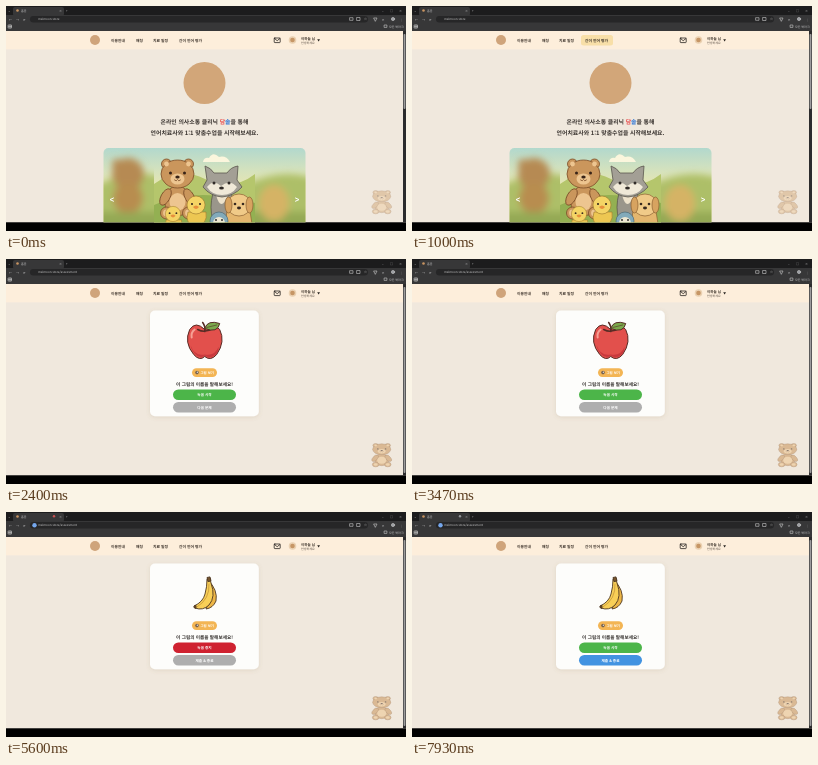
Write an HTML page that moves like this. It is 400 by 225 pixels and loops after 8000 ms.

```html
<!DOCTYPE html>
<html lang="ko">
<head>
<meta charset="utf-8">
<title>언어 평가</title>
<style>
html, body { margin: 0; width: 100%; height: 100%; overflow: hidden; background: #000; }
svg { display: block; width: 100vw; height: 100vh; }
text { font-family: "Noto Sans CJK KR", "Noto Sans CJK", sans-serif; text-rendering: geometricPrecision; }
.mid { text-anchor: middle; }
.bold { font-weight: 700; }
.line { fill: none; stroke-linecap: round; stroke-linejoin: round; }
</style>
</head>
<body>
<svg viewBox="0 0 400 225">
  <defs>
    <filter id="shadow" x="-20%" y="-20%" width="140%" height="140%">
      <feDropShadow dx="0" dy="1" stdDeviation="2" flood-color="#8a7050" flood-opacity=".16"/>
    </filter>
    <filter id="blur"><feGaussianBlur stdDeviation="3.5"/></filter>
    <linearGradient id="sky" x2="0" y2="1">
      <stop stop-color="#b2d8cd"/><stop offset=".3" stop-color="#d5e2bd"/><stop offset=".55" stop-color="#ebe6af"/>
    </linearGradient>
    <clipPath id="screen"><rect y="25" width="400" height="191.3"/></clipPath>
    <clipPath id="slide"><rect x="97.5" y="142" width="202" height="82" rx="5"/></clipPath>
    <clipPath id="scene"><rect x="148" y="142" width="101" height="75"/></clipPath>
    <g id="teddy" stroke="#7a4c28" stroke-width=".8">
      <g fill="#ca965c">
        <ellipse cx="0" cy="27" rx="13" ry="15"/>
        <ellipse cx="-12" cy="23" rx="4.5" ry="9" transform="rotate(28 -12 23)"/>
        <ellipse cx="12" cy="23" rx="4.5" ry="9" transform="rotate(-28 12 23)"/>
        <circle cx="-11" cy="39" r="6"/><circle cx="11" cy="39" r="6"/>
        <circle cx="-11" cy="-10" r="5"/><circle cx="11" cy="-10" r="5"/>
        <ellipse rx="16.5" ry="14"/>
      </g>
      <g fill="#edc590" stroke="none">
        <ellipse cy="28" rx="8" ry="9"/><ellipse cy="5" rx="7" ry="5.5"/>
        <circle cx="-11" cy="-10" r="2.4"/><circle cx="11" cy="-10" r="2.4"/>
        <circle cx="-11" cy="39" r="3.4"/><circle cx="11" cy="39" r="3.4"/>
      </g>
      <g fill="#382317" stroke="none">
        <circle cx="-7" cy="-1" r="1.5"/><circle cx="7" cy="-1" r="1.5"/><ellipse cy="3" rx="2.2" ry="1.5"/>
      </g>
      <path class="line" d="M-3 6Q-1 8 0 5.5Q1 8 3 6"/>
    </g>
    <g id="duck">
      <path d="M-8 7Q-12 20 0 20T10 7Z" fill="#edc752" stroke="#9b762d" stroke-width=".6"/>
      <circle r="9" fill="#f4d465" stroke="#9b762d" stroke-width=".6"/>
      <path d="M-3 2Q0 -1 3 2Q0 6 -3 2Z" fill="#e7903c"/>
      <circle cx="-4" cy="-1" r="1.1" fill="#36291d"/><circle cx="4" cy="-1" r="1.1" fill="#36291d"/>
    </g>
  </defs>

  <rect width="400" height="216.3" fill="#1c1c1d"/>
  <rect x="7" y="1" width="51" height="9" rx="2" fill="#373738"/>
  <rect y="9" width="400" height="16" fill="#373738"/>
  <rect x="24" y="10" width="338" height="6.6" rx="3.3" fill="#262627"/>
  <g fill="#c9c9ca" font-size="3">
    <circle cx="11.5" cy="4.5" r="1.3" fill="#c99461"/>
    <text x="15" y="5.8">홈문</text>
    <text x="2" y="5.8">⌄</text>
    <text x="53" y="5.8">×</text><text x="60" y="5.8">+</text>
    <text x="3" y="14.5">←</text><text x="10" y="14.5">→</text><text x="17" y="14.5">⟳</text>
    <text id="url" x="32" y="14.4"></text>
    <text x="383" y="21.8">모든 북마크</text>
    <text x="376" y="5.6">–</text><text x="384" y="5.6">□</text><text x="393" y="5.6">×</text>
    <text x="358" y="14.4">☆</text>
    <text x="376" y="14.5">⊓</text><text x="394" y="14.5">⋮</text>
  </g>
  <g class="line" stroke="#c9c9ca" stroke-width=".6">
    <rect x="344" y="11.7" width="3" height="2.6"/><rect x="351" y="11.5" width="3" height="3"/>
    <path d="M368 12h3l-1.5 3zM378.5 19h2.4v2.4h-2.4zM2.5 19h3v3h-3zM4 19v3M2.5 20.5h3"/>
    <circle cx="387" cy="13" r="1.6" fill="#9a9da2"/>
  </g>
  <circle id="site" cx="28.5" cy="13.2" r="2.2"/>
  <circle id="dot" cx="48" cy="4.3" r="1.2"/>

  <g clip-path="url(#screen)">
    <rect y="25" width="400" height="192" fill="#f0e8dd"/>
    <rect y="25" width="397" height="18.3" fill="#fdeedb"/>
    <rect id="hover" x="169" y="29" width="32" height="10.4" rx="2.5" fill="#f8dfa8"/>
    <circle cx="89" cy="34" r="5" fill="#cfa47b"/>
    <g class="bold" font-size="3.8" fill="#3a3028">
      <text x="105" y="35.7">이용안내</text><text x="130" y="35.7">매칭</text>
      <text x="147" y="35.7">치료 일정</text><text x="173" y="35.7">간이 언어 평가</text>
    </g>
    <g class="line" stroke="#292521" stroke-width=".8">
      <rect x="268.2" y="32" width="6" height="4.6" rx=".6"/><path d="M268.5 32.5l2.7 2.2 2.7-2.2"/>
    </g>
    <circle cx="286.5" cy="34" r="3.8" fill="#ead1b2"/><circle cx="286.5" cy="34" r="2.3" fill="#c69665"/>
    <text x="295" y="33.8" font-size="3.5" class="bold" fill="#332a22">이하늘 님</text>
    <text x="295" y="38" font-size="3" fill="#5e5349">안녕하세요</text>
    <path d="M311.2 33.3h2.8l-1.4 2.2z" fill="#292521"/>

    <g id="home">
      <circle cx="198.5" cy="77" r="21" fill="#d2a679"/>
      <g class="mid bold" font-size="5.9" fill="#3a3430">
        <text x="198.5" y="118">온라인 의사소통 클리닉 <tspan fill="#e84a4a">담</tspan><tspan fill="#3478d4">솔</tspan>을 통해</text>
        <text x="198.5" y="129">언어치료사와 1:1 맞춤수업을 시작해보세요.</text>
      </g>
      <g clip-path="url(#slide)">
        <rect x="97" y="142" width="203" height="76" fill="url(#sky)"/>
        <g filter="url(#blur)">
          <path d="M85 182Q125 160 160 172V235H85ZM237 180Q280 158 315 176V235H237Z" fill="#adbf68"/>
          <circle cx="122" cy="168" r="16" fill="#b68a52"/><circle cx="111" cy="158" r="5" fill="#b68a52"/>
          <ellipse cx="122" cy="192" rx="15" ry="16" fill="#b88d50"/>
          <path d="M85 206H160V235H85ZM237 206H315V235H237Z" fill="#94a954"/>
          <ellipse cx="268" cy="197" rx="15" ry="18" fill="#d5b365"/>
        </g>
        <g clip-path="url(#scene)">
          <rect x="148" y="142" width="101" height="76" fill="url(#sky)"/>
          <path d="M148 178Q172 160 199 173T249 168V218H148Z" fill="#b5c66c"/>
          <path d="M148 199Q190 180 249 197V218H148Z" fill="#93b052"/>
          <path d="M197 156q1-5 6-4q4-7 10-1q7-2 11 5Z" fill="#fbf6dd"/>
          <use href="#teddy" transform="translate(171.5 168)"/>
          <g stroke="#5b574f" stroke-width=".8">
            <path d="M207 187Q203 202 207 214H227Q231 202 225 187Z" fill="#9a968b"/>
            <path d="M210 189Q215 207 222 189Z" fill="#eee3cc" stroke="none"/>
            <path d="M197 181L201 174L199 160Q205 162 208 167H221Q225 161 232 160L231 174L236 181Q228 190 216 191Q204 190 197 181Z" fill="#a39f95"/>
            <path d="M201 181Q207 173 215 180Q224 173 231 181Q226 189 216 189T201 181Z" fill="#f0e9d8" stroke="none"/>
            <g fill="#302b27" stroke="none"><circle cx="208" cy="177" r="1.5"/><circle cx="223" cy="177" r="1.5"/><ellipse cx="215.5" cy="182" rx="2.4" ry="1.6"/></g>
          </g>
          <g stroke="#8c6032" stroke-width=".7">
            <path d="M221 205H244L246 218H219Z" fill="#e4b66e"/>
            <ellipse cx="233" cy="199" rx="12" ry="11" fill="#f0ca88"/>
            <ellipse cx="222.5" cy="199" rx="3.5" ry="8" fill="#d7a360"/><ellipse cx="243.5" cy="199" rx="3.5" ry="8" fill="#d7a360"/>
            <g fill="#37291f" stroke="none"><circle cx="229" cy="198" r="1.3"/><circle cx="237" cy="198" r="1.3"/><ellipse cx="233" cy="202" rx="2" ry="1.4"/></g>
          </g>
          <use href="#duck" transform="translate(190 199)"/>
          <use href="#duck" transform="translate(167 208) scale(.85)"/>
          <ellipse cx="213" cy="215" rx="9" ry="9" fill="#82aaba" stroke="#4d6b77" stroke-width=".7"/>
          <ellipse cx="213" cy="217" rx="6" ry="6" fill="#eee8d2"/>
          <circle cx="210" cy="214" r="1" fill="#333"/><circle cx="216" cy="214" r="1" fill="#333"/>
        </g>
      </g>
      <path class="line" stroke="#fff" stroke-width="1" d="M107.5 192l-3.5 1.6 3.5 1.6M289.5 192l3.5 1.6-3.5 1.6"/>
    </g>

    <g id="intro">
      <rect x="144" y="51.5" width="108.8" height="110" rx="5" fill="#fdfdfb" filter="url(#shadow)"/>
      <text class="mid bold" x="199" y="62.7" font-size="7.3" fill="#302c29">간이언어평가</text>
      <g class="mid" font-size="3.35" fill="#77716b">
        <text x="199" y="70">의사소통장애(Communication disorder)는 발화, 언어의 문제로 인</text>
        <text x="199" y="74.6">하여 의사소통에 어려움을 겪는 상태를 말합니다.</text>
      </g>
      <rect x="149" y="78" width="100" height="66" rx="3.5" fill="#fcf2e4"/>
      <text class="bold" x="152" y="86" font-size="4.15" fill="#4b392a">무엇을 평가하나요?</text>
      <g id="about" font-size="3.32" fill="#71685f"></g>
      <g id="checks" font-size="3.6" fill="#514a43"></g>
      <g id="chips" class="mid" font-size="2.5" fill="#41729b"></g>
      <rect id="start" x="167" y="146" width="63" height="11" rx="5.5"/>
      <text class="mid bold" x="198.5" y="152.9" font-size="3.8" fill="#fff">시작하기</text>
    </g>

    <g id="quiz">
      <rect x="144" y="51.5" width="108.8" height="105.8" rx="5" fill="#fdfdfb" filter="url(#shadow)"/>
      <g id="apple" transform="translate(.7 .5)" stroke="#572c25" stroke-width="1" stroke-linejoin="round">
        <path d="M198 70Q189 61 183 70Q177 83 187 95Q193 102 198 97Q204 102 210 95Q219 82 213 70Q207 63 198 70Z" fill="#e2504c"/>
        <path d="M184 86Q188 97 198 95Q208 97 212 87Q212 94 206 97Q202 99 198 96Q193 100 188 94Q184 89 184 86Z" fill="#c9393d" stroke="none"/>
        <path class="line" d="M191 70Q198 74 206 69M198 72Q199 67 196 63" stroke-width="1.6"/>
        <path d="M198 69Q201 60 213 64Q211 74 198 69Z" fill="#7ba94b"/>
        <path class="line" d="M200 68L210 65.5" stroke-width=".6"/>
        <path class="line" d="M185 78Q184 73 188 70" stroke="#f6a094" stroke-width="2"/>
      </g>
      <g id="banana" stroke="#4e3822" stroke-width=".9" stroke-linejoin="round">
        <path d="M202 68Q212 78 210 89Q207 96 200 97Q205 87 201 78Z" fill="#edb646"/>
        <path d="M201 67L204 66L205 71Q210 85 203 93Q197 99 189 96L188 94Q197 90 199 82Q201 75 201 67Z" fill="#f8cf57"/>
        <path d="M201 65.5l3-.6 1 4-3 .8zM188 94l2-.6v3l-2-.7z" fill="#76552d"/>
        <path class="line" d="M203 72Q204 87 191 95" stroke="#b68431" stroke-width=".6"/>
      </g>
      <rect x="186" y="109.2" width="25" height="8.8" rx="4.4" fill="#f3b554"/>
      <circle cx="191" cy="113.6" r="1.8" fill="#74604e"/><circle cx="191.4" cy="113.2" r=".7" fill="#e0ded6"/>
      <text x="194.5" y="114.9" font-size="3.4" class="bold" fill="#fff">그림 보기</text>
      <text class="mid bold" x="198.5" y="126.7" font-size="4.65" fill="#302c29">이 그림의 이름을 말해보세요!</text>
      <rect id="rec" x="167" y="130.4" width="63" height="10.6" rx="5.3"/>
      <text id="recText" class="mid bold" x="198.5" y="137" font-size="3.65" fill="#fff"></text>
      <rect id="next" x="167" y="143" width="63" height="10.6" rx="5.3"/>
      <text id="nextText" class="mid bold" x="198.5" y="149.6" font-size="3.65" fill="#fff"></text>
    </g>

    <g id="helper"><use href="#teddy" transform="translate(375.7 190.3) scale(.55 .39)"/></g>
    <rect x="397" y="25" width="3" height="192" fill="#2c2c2d"/>
    <rect id="thumb" x="397.6" y="28" width="1.8" rx=".8" fill="#9d9d9d"/>
  </g>
  <rect id="flash" width="400" height="225" fill="#fff"/>
</svg>
<script>
const $ = id => document.getElementById(id);
const clamp = x => Math.max(0, Math.min(1, x));
const ramp = (t, start, length) => clamp((t - start) / length);
const show = (id, on) => $(id).setAttribute("display", on ? "inline" : "none");
const fill = (id, color) => $(id).setAttribute("fill", color);
const mix = (a, b, p) => `rgb(${a.map((v, i) => Math.round(v + (b[i] - v) * p))})`;

const LOOP = 8000;
const INTRO = 1270, QUIZ = 2330, RECORD = 3800, SECOND = 5070, STOP = 7680;
const GREEN = [76, 181, 73], DARK_GREEN = [68, 164, 65], RED = [207, 34, 48];
const GRAY = [174, 174, 174], BLUE = [66, 147, 225];

$("about").innerHTML = [
  "간이언어평가는 개인의 발화 능력과 언어의 이해 및 표현 능력",
  "의 발달 수준을 간략하게 평가하여 언어 발달 지연이나 의사소",
  "통의 어려움 여부를 신속히 식별하고, 추가적인 정밀 평가나 치료",
  "개입의 필요성을 판단하는 데 도움을 줄 것입니다."
].map((s, i) => `<text x="152" y="${91.6 + i * 5}">${s}</text>`).join("");

$("checks").innerHTML = ["발화 능력", "언어의 이해", "표현 능력"].map((s, i) => {
  const y = 115.5 + i * 6.7;
  return `<path class="line" stroke="#54a438" stroke-width="1.2" d="M152.4 ${y - 1.5}l1.2 1.4 2.3-3"/>
    <text x="156.3" y="${y}">${s}</text>`;
}).join("");

$("chips").innerHTML = [[152, 14, "약 5분"], [168.5, 17, "마이크 필요"], [188, 25, "테스트 결과 제공"]].map(([x, w, s]) =>
  `<rect x="${x}" y="133.3" width="${w}" height="5.8" rx="2" fill="#e4eff8"/>
   <text x="${x + w / 2}" y="137.2">${s}</text>`).join("");

function draw(t) {
  const home = t < INTRO, quiz = t >= QUIZ, second = t >= SECOND;
  const recording = t >= RECORD && t < STOP;
  show("home", home);
  show("intro", !home && !quiz);
  show("quiz", quiz);
  show("apple", !second);
  show("banana", second);
  $("url").textContent = home ? "malmoon.store" : "malmoon.store/assessment";
  $("hover").setAttribute("opacity", home ? ramp(t, 700, 170) : 0);
  $("thumb").setAttribute("height", home ? 75 : 186);
  $("helper").setAttribute("opacity", home ? .4 : .56);

  fill("start", mix(GREEN, DARK_GREEN, ramp(t, 1700, 150)));
  const stopped = ramp(t, STOP, 220);
  fill("rec", t < STOP ? mix(GREEN, RED, ramp(t, RECORD, 200)) : mix(RED, GREEN, stopped));
  fill("next", mix(GRAY, BLUE, stopped));
  $("recText").textContent = recording ? "녹음 중지" : "녹음 시작";
  $("nextText").textContent = second ? "제출 & 종료" : "다음 문제";

  show("site", t >= RECORD);
  fill("site", "#75a7ed");
  show("dot", t >= RECORD);
  fill("dot", recording ? "#cc5353" : "#92959a");

  // A faint white veil joins the two questions.
  const veil = ramp(t, 4400, 270) - ramp(t, SECOND, 300);
  $("flash").setAttribute("opacity", .14 * veil);
}

function tick() {
  draw(performance.now() % LOOP);
  requestAnimationFrame(tick);
}
tick();
</script>
</body>
</html>
```
